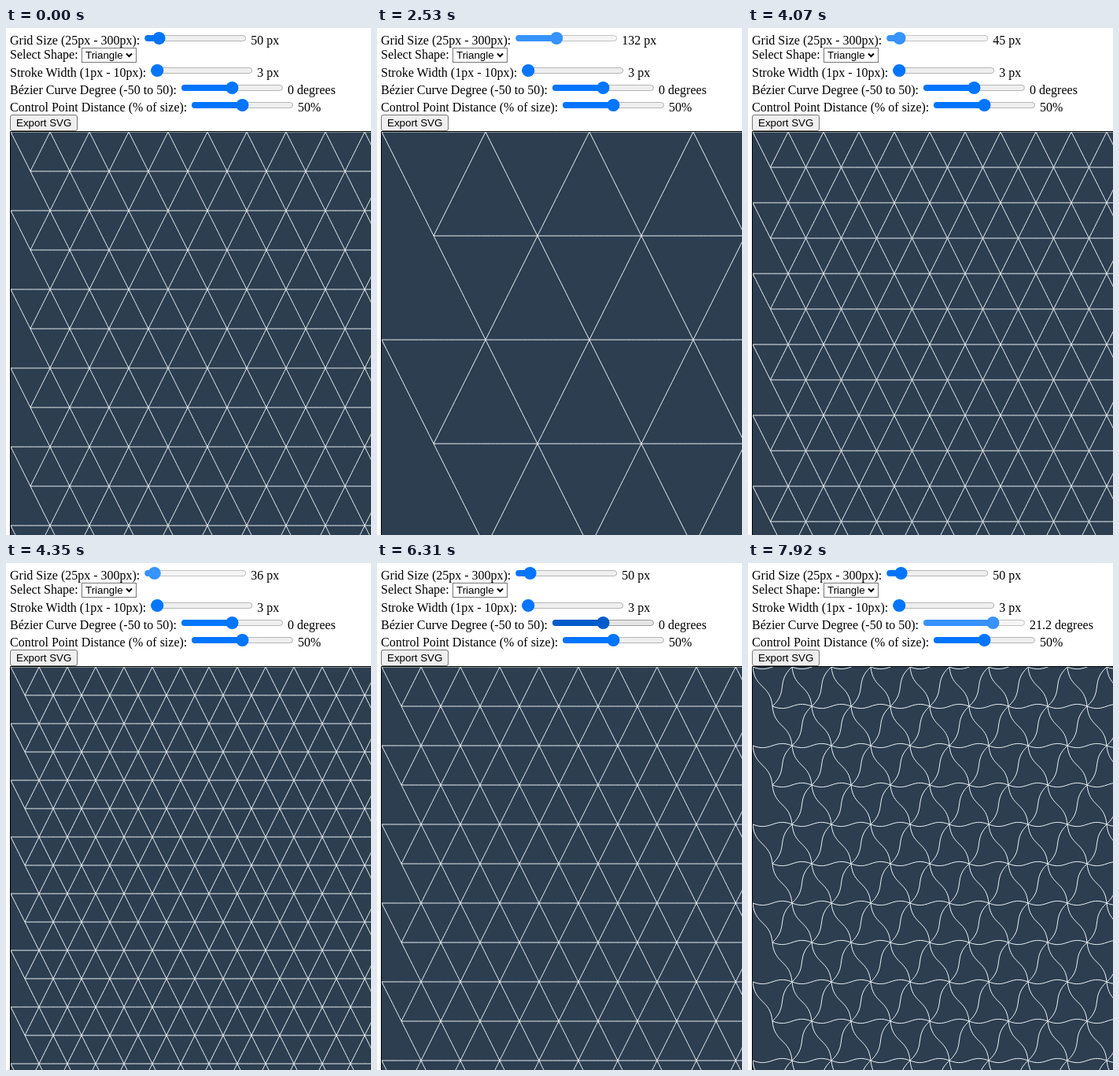
An HTML page that plays this animation: 464 by 644 pixels, repeating every 8 s.

```html
<!DOCTYPE html>
<html lang="en">
<head>
<meta charset="utf-8">
<title>Triangle pattern controls</title>
<style>
  html, body { margin: 0; width: 100%; height: 100%; overflow: hidden; background: #fff; }
  svg { display: block; }
  text { font: 16px "Liberation Serif", "Times New Roman", serif; white-space: pre; }
  .ui { font: 13.333px "Liberation Sans", Arial, sans-serif; }
</style>
</head>
<body>
<svg id="stage" width="464" height="644" viewBox="0 0 464 644">
  <text x="5" y="21">Grid Size (25px - 300px):</text>
  <text x="5" y="39">Select Shape:</text>
  <text x="5" y="62">Stroke Width (1px - 10px):</text>
  <text x="5" y="84">Bézier Curve Degree (-50 to 50):</text>
  <text x="5" y="106">Control Point Distance (% of size):</text>

  <rect x="96.5" y="25.5" width="69" height="18" fill="#fff" stroke="#767676"/>
  <text class="ui" x="101" y="39">Triangle</text>
  <path d="M153 32.5l3.5 3.5 3.5-3.5" fill="none" stroke="#000" stroke-width="2"/>

  <svg x="6" y="132" width="458" height="512">
    <rect width="458" height="512" fill="#2c3e50"/>
    <path id="grid" fill="none" stroke="#ecf0f1"/>
  </svg>
  <path d="M5.5 644V131.5H464" fill="none" stroke="#000"/>
  <rect x="5.5" y="110.5" width="85" height="20" rx="2.5" fill="#efefef" stroke="#767676"/>
  <text class="ui" x="13" y="125">Export SVG</text>
</svg>
<script>
const LOOP = 8000, TICK = 70;
const stage = document.getElementById('stage');
const grid = document.getElementById('grid');

// Colours by state: idle, hovered, pressed
const ACCENT = ['#0075ff', '#005cc8', '#3793ff'];
const TRACK = ['#efefef', '#e5e5e5', '#f5f5f5'];
const BORDER = ['#767676', '#4f4f4f', '#8d8d8d'];

function add(tag, attrs) {
  const el = document.createElementNS('http://www.w3.org/2000/svg', tag);
  set(el, attrs);
  return stage.appendChild(el);
}

function set(el, attrs) {
  for (const key in attrs) el.setAttribute(key, attrs[key]);
}

function slider(x, y, min, max, unit) {
  const track = add('rect', { x: x + .5, y: y - 3.5, width: 128, height: 7, rx: 3.5, 'stroke-opacity': .5 });
  const bar = add('rect', { x, y: y - 4, height: 8, rx: 4 });
  const thumb = add('circle', { cy: y, r: 8 });
  const label = add('text', { x: x + 135, y: y + 8 });
  return (value, text, trackState = 0, thumbState = 0) => {
    const pos = 8 + (value - min) / (max - min) * 113;
    set(track, { fill: TRACK[trackState], stroke: BORDER[trackState] });
    set(bar, { width: pos, fill: ACCENT[trackState] });
    set(thumb, { cx: x + pos, fill: ACCENT[thumbState] });
    label.textContent = text + unit;
  };
}

const sizeSlider = slider(176.3, 13, 25, 300, ' px');
const strokeSlider = slider(184.3, 54, 1, 10, ' px');
const degreeSlider = slider(223, 76, -50, 50, ' degrees');
const distanceSlider = slider(236, 98, 0, 100, '%');

// Drags: start, end, first value, last value
const SIZE = [
  [0, 0, 50, 50], [780, 780, 100, 100], [1550, 1620, 125, 148],
  [2390, 2530, 146, 132], [2530, 3090, 132, 64], [3370, 3510, 59, 55],
  [3790, 3860, 52, 49], [4070, 4350, 45, 36], [4770, 4980, 40, 51],
  [5470, 5540, 49, 50]
];
const DEGREE = [[0, 0, 0, 0], [7080, 7290, 2.2, 8.4], [7290, 7920, 8.4, 21.2]];

// Pointer states: time, track, thumb
const SIZE_STATE = [
  [0, 0, 0], [500, 1, 0], [780, 2, 0], [920, 1, 0], [1270, 1, 1],
  [1550, 2, 2], [2110, 1, 1], [2390, 2, 2], [5820, 0, 0]
];
const STROKE_STATE = [[0, 0, 0], [5890, 1, 0], [6170, 0, 0]];
const DEGREE_STATE = [[0, 0, 0], [6310, 1, 1], [6730, 2, 2]];

const latest = (list, t) => list.findLast(item => item[0] <= t);

function valueAt(drags, t) {
  const [start, end, from, to] = latest(drags, t);
  const steps = Math.round((end - start) / TICK);
  if (!steps) return to;
  return from + (to - from) * Math.min(Math.floor((t - start) / TICK), steps) / steps;
}

// Edge whose two handles are turned by the same angle
function edge(x1, y1, x2, y2, angle) {
  const c = Math.cos(angle) / 2, s = Math.sin(angle) / 2;
  const dx = x2 - x1, dy = y2 - y1;
  const hx = dx * c - dy * s, hy = dx * s + dy * c;
  const points = [x1 + hx, y1 + hy, x2 - hx, y2 - hy, x2, y2];
  return 'C' + points.map(n => n.toFixed(2)).join(' ');
}

function pattern(size, degree) {
  const angle = degree * Math.PI / 180;
  let d = '';
  for (let row = 0; row * size < 520; row++) {
    const y = row * size;
    for (let x = row % 2 * size / 2; x < 470; x += size) {
      const right = x + size, mid = x + size / 2, low = y + size;
      d += `M${x} ${y}` + edge(x, y, right, y, angle) +
        edge(right, y, mid, low, angle) + edge(mid, low, x, y, angle) + 'Z';
    }
  }
  return d;
}

let shown = '';

function draw(t) {
  const size = Math.round(valueAt(SIZE, t));
  const degree = +valueAt(DEGREE, t).toFixed(1);
  const [, ...sizeState] = latest(SIZE_STATE, t);
  const [, ...strokeState] = latest(STROKE_STATE, t);
  const [, ...degreeState] = latest(DEGREE_STATE, t);
  const key = [size, degree, sizeState, strokeState, degreeState].join();
  if (key === shown) return;
  shown = key;
  sizeSlider(size, size, ...sizeState);
  strokeSlider(1, 3, ...strokeState);
  degreeSlider(degree, degree, ...degreeState);
  grid.setAttribute('d', pattern(size, degree));
}

distanceSlider(50, 50);
draw(0);
const begin = performance.now();
requestAnimationFrame(function tick() {
  draw((performance.now() - begin) % LOOP);
  requestAnimationFrame(tick);
});
</script>
</body>
</html>
```
